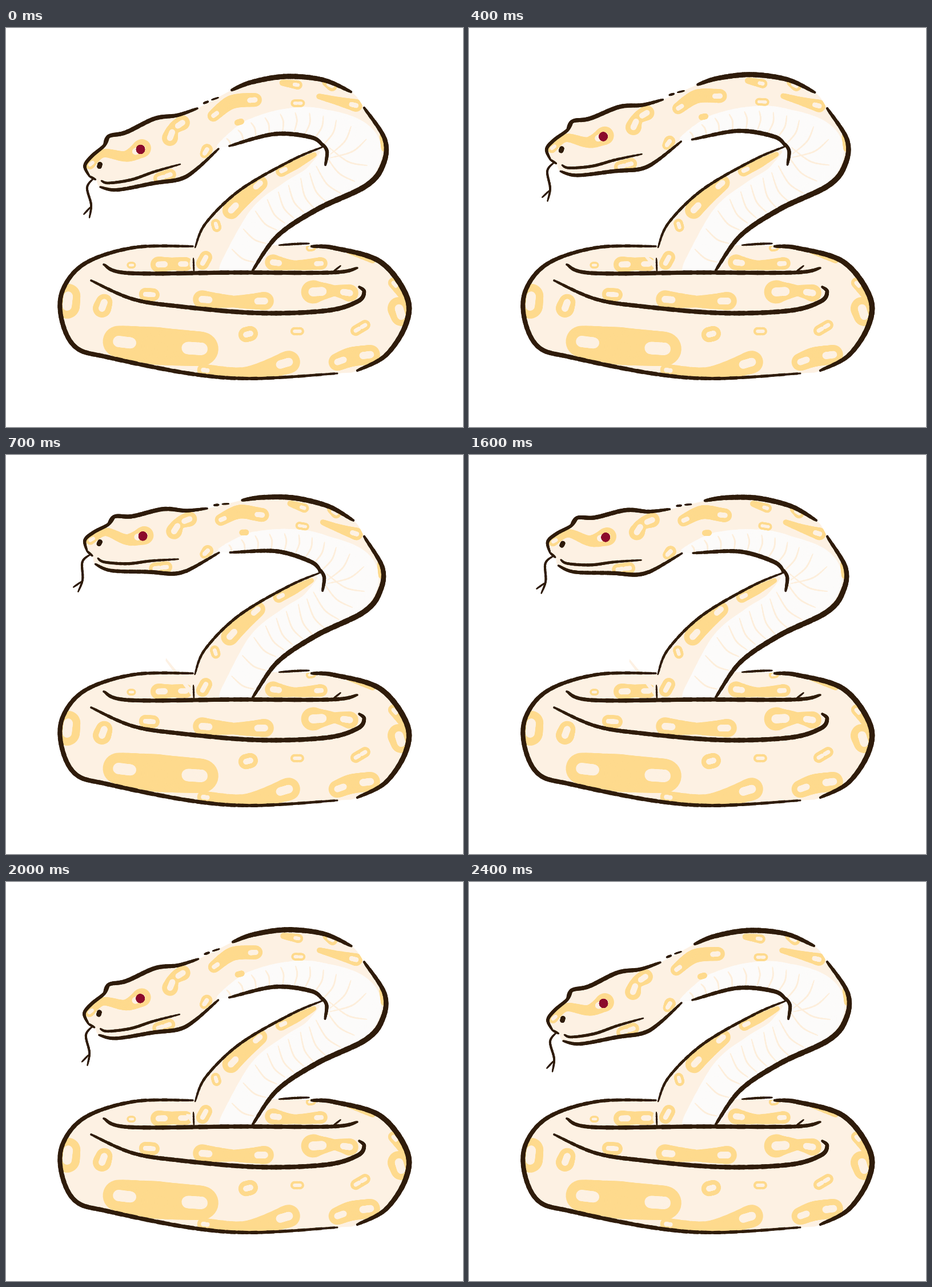
Animation of 800 by 700 pixels, one loop 3000 ms. Source, as an HTML page with a canvas:

```html
<!DOCTYPE html>
<html lang="en">
<head>
<meta charset="utf-8">
<title>Snake</title>
<style>
html, body { margin: 0; width: 100%; height: 100%; overflow: hidden; background: #fff; }
canvas { display: block; }
</style>
</head>
<body>
<canvas id="stage" width="800" height="700"></canvas>
<script>
const ctx = document.getElementById('stage').getContext('2d');
const INK = '#2f1c0b', CREAM = '#fdf1e3', YELLOW = '#feda8d', BELLY = '#fcfbfa', RIB = '#fdeedb', EYE = '#8c0a2b';

const clamp = v => Math.max(0, Math.min(1, v));
const mix = (a, b, t) => a + (b - a) * t;
const parse = s => s.split(' ').map(p => p.split(',').map(Number));
const still = p => p;

// Point on a Catmull-Rom curve; u counts key points. A third value is a width.
function at(points, u, closed) {
  const n = points.length, i = Math.min(Math.floor(u), closed ? n - 1 : n - 2), t = u - i;
  const key = k => points[closed ? (k + n) % n : Math.max(0, Math.min(n - 1, k))];
  const [a, b, c, d] = [key(i - 1), key(i), key(i + 1), key(i + 2)];
  const axis = j => 0.5 * (2 * b[j] + (c[j] - a[j]) * t + (2 * a[j] - 5 * b[j] + 4 * c[j] - d[j]) * t * t
    + (3 * b[j] - a[j] - 3 * c[j] + d[j]) * t * t * t);
  return [axis(0), axis(1), mix(b[2], c[2], t)];
}

function ring(points, place) {
  const path = new Path2D();
  for (let u = 0; u < points.length; u += 0.125) path.lineTo(...place(at(points, u, true)).slice(0, 2));
  path.closePath();
  return path;
}

// Stroke with the widths of its points, or with one width that thins at both ends.
function brush(points, color, place, width) {
  const last = points.length - 1, steps = last * 16;
  ctx.strokeStyle = color;
  ctx.lineCap = 'round';
  let from = place(at(points, 0));
  for (let k = 1; k <= steps; k++) {
    const raw = at(points, last * k / steps), to = place(raw);
    const size = width ? width * (0.35 + 0.65 * Math.sqrt(Math.sin(Math.PI * (k - 0.5) / steps))) : raw[2];
    ctx.lineWidth = size + 0.4 * Math.sin(k * 2.3);
    ctx.beginPath();
    ctx.moveTo(from[0], from[1]);
    ctx.lineTo(to[0], to[1]);
    ctx.stroke();
    from = to;
  }
}

// Yellow blotch with a pale oval reaching inwards from each wide end.
function spot(points, place) {
  brush(points, YELLOW, place);
  [points, [...points].reverse()].forEach(([[x, y, w], [nx, ny]]) => {
    if (w < 11) return;
    const reach = Math.min(1, 0.4 * w / Math.hypot(nx - x, ny - y));
    brush([[x, y, 0.36 * w], [mix(x, nx, reach), mix(y, ny, reach), 0.36 * w]], CREAM, place);
  });
}

// Belly scales: evenly spaced bowed lines across the spine.
function ribs(spine, place) {
  const count = 23, last = spine.length - 1;
  for (let k = 1; k < count; k++) {
    const u = last * k / count, [x, y, w] = at(spine, u), [ax, ay] = at(spine, u + 0.02);
    const len = Math.hypot(ax - x, ay - y), tx = (ax - x) / len, ty = (ay - y) / len;
    const across = (side, bow) => [x - ty * side * w + tx * bow * w, y + tx * side * w + ty * bow * w];
    brush([across(-0.32, 0), across(0, 0.08), across(0.4, 0)], RIB, place, 2.6);
  }
}

// Raises the neck around the inside of its bend; the head turns the most.
function lift(amount) {
  const qx = 549, qy = 218;
  return ([x, y]) => {
    const head = x < 322, upper = head || x > 556 || y < 205 + (556 - x) * 0.22;
    const lean = amount * (head ? 1 : clamp((400 - y) / 160));
    let angle = Math.atan2(qy - y, x - qx) * 180 / Math.PI;
    if (x < 556 && angle < 0) angle += 360;
    const bend = upper ? mix(clamp(0.08 + 0.005 * angle), 1, clamp((420 - x) / 90)) : 0;
    const a = 0.218 * bend * amount, dx = x - qx - 5 * lean, dy = y - qy - 2 * lean;
    return [qx + dx * Math.cos(a) - dy * Math.sin(a), qy + dx * Math.sin(a) + dy * Math.cos(a)];
  };
}

// edges: stretches of the outline to ink, as first point, last point, width.
const coil = {
  outline: parse('327,383 225,385 140,412 100,458 97,510 122,560 180,578 320,606 430,615 580,606 615,601 665,574 700,520 701,470 655,410 575,386 535,383 478,381'),
  edges: [[0, 9, 8], [10, 16, 9.5]],
  lines: [
    ['478,381 505,379 531,378', 4], ['171,415 215,430 400,429 570,429 615,421', 7.5], ['572,428 586,417', 3],
    ['149,443 220,475 300,488 440,500 560,496 615,480 627,463 618,454', 8]
  ],
  spots: [
    '109,470,42 107,488,44', '172,481,28 168,492,32', '244,467,22 258,468,22', '217,416,11 222,416,11',
    '267,415,28 290,414,22 315,414,24', '467,411,28 505,416,16 552,413,22', '531,386,12 537,385,12',
    '343,476,32 400,480,20 453,479,32', '537,463,42 575,461,18 602,465,30', '600,392,8 642,408,10',
    '688,492,40 692,505,36', '678,447,18 706,480,18', '197,550,54 265,558,66 342,563,60',
    '345,600,20 420,608,26 495,586,40', '420,538,26 428,536,26', '505,532,14 515,532,14',
    '612,531,18 629,521,18', '580,586,30 605,577,34 638,573,34'
  ]
};

const neck = {
  outline: parse('335,141 300,153 260,159 210,183 180,190 172,206 150,225 138,242 146,260 157,266 165,279 195,284 260,272 305,265 333,248 372,212 391,207 470,186 535,192 556,208 500,232 410,284 350,342 331,385 329,425 432,425 475,365 545,318 630,277 660,240 663,195 627,140 604,112 555,91 490,85 430,95 395,109'),
  edges: [[0, 5, 7.5], [4, 8, 6], [8, 9, 4], [10, 15, 7], [16, 19, 7.5], [19, 23, 5], [25, 31, 9.5], [32, 36, 9]],
  lines: [
    ['554,203 562,217 559,241', 6], ['328,404 329,427', 3], ['346,132 354,129', 4], ['360,126 372,122', 3],
    ['167,268 180,272 220,266 260,252 305,239', 5], ['153,264 142,280 149,310 146,333', 4], ['148,314 136,327', 3]
  ],
  spine: parse('375,208,10 430,178,36 500,163,44 560,178,66 605,218,105 560,275,88 505,305,76 455,342,70 402,425,58'),
  spots: [
    '147,240,16 170,220,14 210,225,18 238,211,32', '287,193,28 293,177,20 309,166,26', '268,264,20 288,257,20',
    '347,221,14 352,213,20', '363,154,20 395,130,24 436,126,24', '405,166,10 412,164,10',
    '484,96,10 511,100,16', '505,132,13 517,132,13', '559,96,10 571,102,18',
    '548,120,9 580,128,14 613,136,22', '659,190,10 662,212,10', '394,320,30 415,298,30 445,272,26',
    '482,251,20 510,238,16 540,222,8', '367,343,16 369,350,16', '344,413,22 350,402,22'
  ]
};

function paint(part, place) {
  const shape = ring(part.outline, place);
  ctx.fillStyle = CREAM;
  ctx.fill(shape);
  ctx.save();
  ctx.clip(shape);
  if (part.spine) {
    brush(part.spine, BELLY, place);
    ribs(part.spine, place);
  }
  part.spots.forEach(s => spot(parse(s), place));
  ctx.restore();
}

function ink(part, place) {
  part.edges.forEach(([from, to, width]) => brush(part.outline.slice(from, to + 1), INK, place, width));
  part.lines.forEach(([points, width]) => brush(parse(points), INK, place, width));
}

// Fast rise until 700 ms, hold, slower fall from 1500 ms; both settle softly.
const settle = x => 1 / (1 + Math.max(0, x) ** 3.4);
function pose(time) {
  if (time < 100 || time >= 2400) return 0;
  return time < 1500 ? settle((700 - time) / 240) : settle((time - 1500) / 280);
}

function draw(time) {
  const place = lift(pose(time));
  ctx.fillStyle = '#fff';
  ctx.fillRect(0, 0, 800, 700);
  paint(coil, still);
  paint(neck, place);
  ink(neck, place);
  brush([[164.5, 239, 8], [163.5, 243, 8]], INK, place);
  brush([[235.5, 212.5, 15], [235.5, 213.5, 15]], EYE, place);
  ink(coil, still);
}

const start = performance.now();
let shown = -1;
function tick() {
  const step = Math.floor((performance.now() - start) % 3000 / 100);
  if (step !== shown) draw((shown = step) * 100);
  requestAnimationFrame(tick);
}
tick();
</script>
</body>
</html>
```
